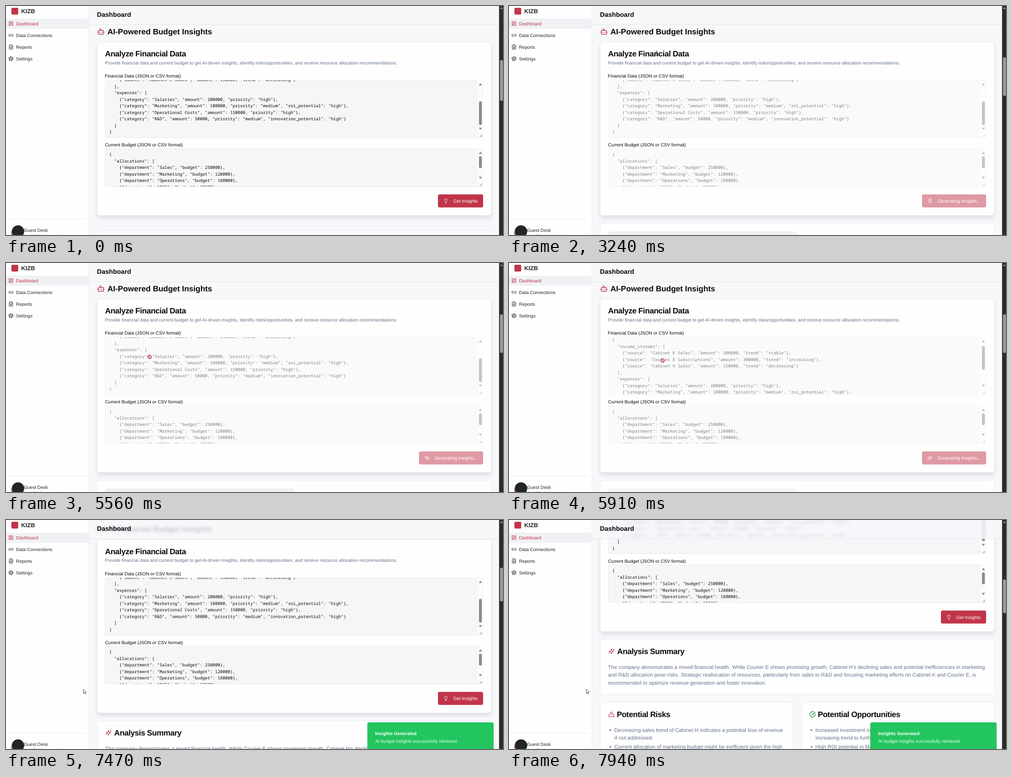
Write an HTML page that moves like this. It is 1100x509 px and loops after 8000 ms.

```html
<!DOCTYPE html>
<html lang="en">
<head>
<meta charset="utf-8">
<title>Budget dashboard</title>
<style>
html, body { margin: 0; width: 100%; height: 100%; overflow: hidden; background: #f7f8fa; }
svg, header { position: absolute; left: 0; top: 0; }
svg { width: 1100px; height: 509px; overflow: hidden; }
header {
  left: 184px; width: 907px; height: 41px;
  background: rgba(247, 248, 250, .8); border-bottom: 1px solid #e3e6eb;
  backdrop-filter: blur(3px);
}
text { font: 10.15px "Liberation Sans", Arial, sans-serif; fill: #09090b; white-space: pre; text-rendering: geometricPrecision; }
.h1 { font-size: 17.4px; font-weight: 700; }
.h2 { font-size: 17.4px; font-weight: 700; letter-spacing: -.435px; }
.bar { font-size: 14.5px; font-weight: 700; }
.logo { font-size: 13.05px; font-weight: 700; fill: #27272a; }
.strong { font-weight: 700; }
.small { font-size: 8.7px; }
.nav text { fill: #27272a; }
.nav .on { fill: #c1354a; }
.muted { fill: #64748b; }
.body text { font-size: 11.6px; fill: #64748b; }
.code text { font: 9.3px "Noto Sans Mono", "Liberation Mono", monospace; fill: #09090b; }
.white text { fill: #fff; }
.icon { fill: none; stroke: currentColor; stroke-width: 2; stroke-linecap: round; stroke-linejoin: round; }
.red { color: #c1354a; }
.green { color: #15803d; }
.dark { color: #27272a; }
.card { fill: #fefefe; stroke: #e4e7ec; stroke-width: .8; }
.raised { filter: drop-shadow(0 6px 5px rgba(15, 23, 42, .11)); }
.field { fill: #f5f6f8; stroke: #e1e4e9; stroke-width: .8; }
.track { fill: #fcfcfc; }
.thumb { fill: #8b8b8b; }
.grip { fill: none; stroke: #444; stroke-width: .9; }
.pointer { fill: #fff; stroke: #222; stroke-width: .8; stroke-linejoin: round; }

.loop, .step { animation: 8s linear infinite; }
.step { animation-timing-function: step-end; }
.idle { animation-name: idle; }
.busy { animation-name: busy; }
.done { animation-name: done; }
.ready { animation-name: ready; }
.fields { animation-name: fields; }
.page { animation-name: page; }
.lines { animation-name: lines; }
.slider { animation-name: slider; }
.outer { fill: #9e9e9e; animation-name: outer; }
.toast { animation-name: toast; }
.mouse { animation-name: mouse; }
.arrow { animation-name: arrow; }
.hand { animation-name: hand; }
.beam { animation-name: beam; }
.block { animation-name: block; }
.spin { animation: spin 1s -.63s linear infinite; }
.pulse { fill: #eff1f4; animation: pulse 2s -.59s cubic-bezier(.4, 0, .6, 1) infinite; }

@keyframes spin { to { transform: rotate(360deg); } }
@keyframes pulse { 50% { opacity: .5; } }
@keyframes idle { 0% { opacity: 1; } 17.625%, 100% { opacity: 0; } }
@keyframes busy { 0% { opacity: 0; } 17.625% { opacity: 1; } 76.375%, 100% { opacity: 0; } }
@keyframes done { 0% { opacity: 0; } 76.375%, 100% { opacity: 1; } }
@keyframes ready { 0% { opacity: 1; } 17.625% { opacity: 0; } 76.375%, 100% { opacity: 1; } }
@keyframes fields { 0% { opacity: 1; } 17.625% { opacity: .5; } 76.375%, 100% { opacity: 1; } }
@keyframes page {
  0%, 93.3% { transform: translateY(0); }
  93.375% { transform: translateY(-36.3px); }
  99.25%, 100% { transform: translateY(-217.5px); }
}
@keyframes lines {
  0%, 72% { transform: translateY(-72.5px); }
  73.875% { transform: translateY(-7.2px); }
  74.6%, 78.7% { transform: translateY(0); }
  81.5%, 86.45% { transform: translateY(-70.5px); }
  86.5%, 100% { transform: translateY(-72.5px); }
}
@keyframes slider {
  0%, 72% { transform: translateY(30.4px); }
  73.875% { transform: translateY(3px); }
  74.6%, 78.7% { transform: translateY(0); }
  81.5%, 86.45% { transform: translateY(29.6px); }
  86.5%, 100% { transform: translateY(30.4px); }
}
@keyframes outer {
  0%, 17.62% { y: 120px; height: 91px; }
  17.625%, 76.37% { y: 114px; height: 86px; }
  76.375%, 93.3% { y: 101px; height: 75px; }
  93.375% { y: 106px; height: 75px; }
  99.25%, 100% { y: 132px; height: 75px; }
}
@keyframes toast {
  0%, 76.375% { transform: translateY(64px); }
  78%, 100% { transform: translateY(0); }
}
@keyframes mouse {
  0%, 3.25% { transform: translate(1046px, 488px); }
  7% { transform: translate(1010px, 455px); }
  11.75%, 14.2% { transform: translate(988px, 431px); }
  15.9%, 22% { transform: translate(992.5px, 435.5px); }
  28% { transform: translate(640px, 235px); }
  34% { transform: translate(390px, 104px); }
  40.5% { transform: translate(326.5px, 105px); }
  47% { transform: translate(300px, 106px); }
  51% { transform: translate(262px, 118px); }
  57.375%, 60% { transform: translate(222.5px, 144px); }
  68% { transform: translate(310px, 206px); }
  73.875%, 89% { transform: translate(340px, 217px); }
  90.75%, 100% { transform: translate(171px, 376px); }
}
@keyframes arrow {
  0% { opacity: 0; } 3.25% { opacity: 1; } 8.2% { opacity: 0; } 17.625% { opacity: 1; }
  24.5% { opacity: 0; } 49% { opacity: 1; } 62.5% { opacity: 0; } 89.4%, 100% { opacity: 1; }
}
@keyframes hand { 0% { opacity: 0; } 8.2% { opacity: 1; } 17.625%, 100% { opacity: 0; } }
@keyframes beam {
  0% { opacity: 0; } 31.5% { opacity: 1; } 49% { opacity: 0; } 76.375% { opacity: 1; } 89.4%, 100% { opacity: 0; }
}
@keyframes block {
  0% { opacity: 0; } 24.5% { opacity: 1; } 31.5% { opacity: 0; } 62.5% { opacity: 1; } 76.375%, 100% { opacity: 0; }
}
</style>
</head>
<body>
<svg viewBox="0 0 1100 509">
  <defs>
    <clipPath id="clip1"><rect x="220" y="165.5" width="824" height="126.5"/></clipPath>
    <clipPath id="clip2"><rect x="220" y="318" width="824" height="83"/></clipPath>
    <g id="spark" class="icon">
      <path d="m12 3-1.9 5.8a2 2 0 0 1-1.3 1.3L3 12l5.8 1.9a2 2 0 0 1 1.3 1.3L12 21l1.9-5.8a2 2 0 0 1 1.3-1.3L21 12l-5.8-1.9a2 2 0 0 1-1.3-1.3ZM20 3v4M22 5h-4M4 17v2M5 18H3"/>
    </g>
    <path id="up" d="M-3.6 2.6h7.2L0-2.6z" fill="#8b8b8b"/>
    <g id="corner"><rect class="track" x="-6" y="-6.5" width="11" height="11"/><path class="grip" d="M-2.5 3l5-5M.5 3l2-2"/></g>
  </defs>

  <g class="loop page">
    <g class="icon red" transform="translate(201.4 48.4) scale(.725)">
      <path d="M12 8V4H8M2 14h2M20 14h2M15 13v2M9 13v2"/><rect x="4" y="8" width="16" height="12" rx="2"/>
    </g>
    <text class="h1" x="224.4" y="63">AI-Powered Budget Insights</text>

    <rect class="card raised" x="202" y="80.7" width="872" height="384.8" rx="5.8"/>
    <text class="h2" x="219.3" y="112.2">Analyze Financial Data</text>
    <text class="muted" x="219" y="129.9">Provide financial data and current budget to get AI-driven insights, identify risks/opportunities, and receive resource allocation recommendations.</text>
    <text x="218.8" y="159.3">Financial Data (JSON or CSV format)</text>
    <text x="219.2" y="312.2">Current Budget (JSON or CSV format)</text>

    <g class="step fields">
      <rect class="field" x="219.6" y="165" width="836" height="127.5" rx="4"/>
      <rect class="track" x="1044" y="165.6" width="11.3" height="126.4" rx="3"/>
      <g clip-path="url(#clip1)"><g class="loop lines code">
        <text x="228.4" y="181.5">{</text>
        <text x="239.6" y="196">"income_streams": [</text>
        <text x="250.7" y="210.5">{"source": "Cabinet K Sales", "amount": 500000, "trend": "stable"},</text>
        <text x="250.7" y="225">{"source": "Courier E Subscriptions", "amount": 300000, "trend": "increasing"},</text>
        <text x="250.7" y="239.5">{"source": "Cabinet H Sales", "amount": 150000, "trend": "decreasing"}</text>
        <text x="239.6" y="254">],</text>
        <text x="239.6" y="268.5">"expenses": [</text>
        <text x="250.7" y="283">{"category": "Salaries", "amount": 200000, "priority": "high"},</text>
        <text x="250.7" y="297.5">{"category": "Marketing", "amount": 100000, "priority": "medium", "roi_potential": "high"},</text>
        <text x="250.7" y="312">{"category": "Operational Costs", "amount": 150000, "priority": "high"},</text>
        <text x="250.7" y="326.5">{"category": "R&amp;D", "amount": 50000, "priority": "medium", "innovation_potential": "high"}</text>
        <text x="239.6" y="341">]</text>
        <text x="228.4" y="355.5">}</text>
      </g></g>
      <use href="#up" x="1050" y="173.8"/>
      <use href="#up" transform="translate(1050 273) scale(1 -1)"/>
      <rect class="thumb loop slider" x="1046.8" y="181.6" width="6.4" height="52.5" rx="3.2"/>
      <use href="#corner" x="1051" y="288"/>

      <rect class="field" x="219.6" y="317.5" width="836" height="84" rx="4"/>
      <rect class="track" x="1044" y="318" width="11.3" height="83" rx="3"/>
      <g class="code" clip-path="url(#clip2)">
        <text x="228.4" y="333.4">{</text>
        <text x="239.6" y="347.9">"allocations": [</text>
        <text x="250.7" y="362.4">{"department": "Sales", "budget": 250000},</text>
        <text x="250.7" y="376.9">{"department": "Marketing", "budget": 120000},</text>
        <text x="250.7" y="391.4">{"department": "Operations", "budget": 180000},</text>
        <text x="250.7" y="405.9">{"department": "R&amp;D", "budget": 60000}</text>
      </g>
      <use href="#up" x="1050" y="326.3"/>
      <use href="#up" transform="translate(1050 382) scale(1 -1)"/>
      <rect class="thumb" x="1046.8" y="334" width="6.4" height="26.3" rx="3.2"/>
      <use href="#corner" x="1051" y="397"/>
    </g>

    <g class="step ready white">
      <rect x="956" y="418.8" width="100" height="29" rx="4" fill="#c1354a"/>
      <path class="icon" color="#fff" transform="translate(967.7 427.6) scale(.483)" d="M15 14c.2-1 .7-1.7 1.5-2.5 1-.9 1.5-2.2 1.5-3.5A6 6 0 0 0 6 8c0 1 .2 2.2 1.5 3.5.7.7 1.3 1.5 1.5 2.5M9 18h6M10 22h4"/>
      <text x="989.9" y="437">Get Insights</text>
    </g>

    <rect class="step idle" x="202" y="488.6" width="872" height=".8" fill="#e2e5ea"/>

    <g class="step busy">
      <g class="white" opacity=".5">
        <rect x="914" y="418.8" width="142" height="29" rx="4" fill="#c1354a"/>
        <g transform="translate(931.7 433.4)"><g class="spin">
          <use href="#spark" color="#fff" transform="scale(.483) translate(-12 -12)"/>
        </g></g>
        <text x="948.2" y="437">Generating Insights...</text>
      </g>
      <rect class="card" x="202" y="483.7" width="872" height="120" rx="5.8"/>
      <rect class="pulse" x="219.5" y="501" width="418" height="23" rx="4"/>
    </g>

    <g class="step done">
      <rect class="card" x="202" y="483.3" width="872" height="121.8" rx="5.8"/>
      <use href="#spark" class="red" transform="translate(219.4 502.4) scale(.604)"/>
      <text class="h2" x="239.6" y="515.5">Analysis Summary</text>
      <g class="body">
        <text x="219.2" y="548.2">The company demonstrates a mixed financial health. While Courier E shows promising growth, Cabinet H's declining sales and potential inefficiencies in marketing</text>
        <text x="219.2" y="565.6">and R&amp;D allocation pose risks. Strategic reallocation of resources, particularly from sales to R&amp;D and focusing marketing efforts on Cabinet K and Courier E, is</text>
        <text x="219.2" y="583">recommended to optimize revenue generation and foster innovation.</text>
      </g>

      <rect class="card" x="202" y="623" width="427.3" height="200" rx="5.8"/>
      <path class="icon red" transform="translate(219.4 642.3) scale(.604)" d="m21.7 18-8-14a2 2 0 0 0-3.5 0l-8 14A2 2 0 0 0 4 21h16a2 2 0 0 0 1.7-3M12 9v4M12 17h.01"/>
      <text class="h2" x="238.5" y="655.3">Potential Risks</text>
      <rect class="card" x="646.8" y="623" width="427.2" height="200" rx="5.8"/>
      <path class="icon green" transform="translate(664.4 642.3) scale(.604)" d="M21.8 10A10 10 0 1 1 17 3.3M9 11l3 3L22 4"/>
      <text class="h2" x="683.5" y="655.3">Potential Opportunities</text>
      <g class="body">
        <g fill="#64748b">
          <circle cx="224.3" cy="684.4" r="1.8"/><circle cx="224.3" cy="721.8" r="1.8"/>
          <circle cx="669.3" cy="684.4" r="1.8"/><circle cx="669.3" cy="721.8" r="1.8"/>
        </g>
        <text x="233" y="688">Decreasing sales trend of Cabinet H indicates a potential loss of revenue</text>
        <text x="233.5" y="705.4">if not addressed.</text>
        <text x="233.2" y="725.4">Current allocation of marketing budget might be inefficient given the high</text>
        <text x="678" y="688">Increased investment in Courier E can leverage its</text>
        <text x="678.3" y="705.4">increasing trend to further boost revenue.</text>
        <text x="678" y="725.4">High ROI potential in Marketing and innovation</text>
      </g>
    </g>
  </g>
</svg>

<header></header>

<svg viewBox="0 0 1100 509">
  <text class="bar" x="201.2" y="23.7">Dashboard</text>

  <rect width="183.5" height="509" fill="#fefefe"/>
  <rect x="183.2" width=".8" height="509" fill="#e3e6eb"/>
  <rect x="12" y="4" width="15" height="15" rx="2" fill="#c1354a"/>
  <text class="logo" x="33.8" y="16.2">KIZB</text>
  <rect y="28" width="183.2" height="22.5" fill="#f0f1f4"/>
  <g class="icon red" transform="translate(5.2 33.4) scale(.483)">
    <rect x="3" y="3" width="7" height="9" rx="1"/><rect x="14" y="3" width="7" height="5" rx="1"/>
    <rect x="14" y="12" width="7" height="9" rx="1"/><rect x="3" y="16" width="7" height="5" rx="1"/>
  </g>
  <path class="icon dark" transform="translate(5.2 59.4) scale(.483)" d="M9 17H7A5 5 0 0 1 7 7h2M15 7h2a5 5 0 1 1 0 10h-2M8 12h8"/>
  <path class="icon dark" transform="translate(5.2 85.4) scale(.483)" d="M15 2H6a2 2 0 0 0-2 2v16a2 2 0 0 0 2 2h12a2 2 0 0 0 2-2V7ZM14 2v4a2 2 0 0 0 2 2h4M10 9H8M16 13H8M16 17H8"/>
  <g class="icon dark" transform="translate(5.2 111.4) scale(.483)">
    <circle cx="12" cy="12" r="7.8"/><circle cx="12" cy="12" r="3"/>
    <circle cx="12" cy="12" r="9.6" stroke-width="2.6" stroke-linecap="butt" pathLength="12" stroke-dasharray="1 1"/>
  </g>
  <g class="nav">
    <text class="on" x="22.2" y="42.7">Dashboard</text>
    <text x="22.2" y="68.7">Data Connections</text>
    <text x="22.2" y="94.7">Reports</text>
    <text x="22.2" y="120.7">Settings</text>
    <text x="39.8" y="501.5">Guest Desk</text>
  </g>
  <text class="muted small" x="40" y="513.6">desk@kizb.example</text>
  <rect x="5.8" y="473" width="171.5" height=".8" fill="#e3e6eb"/>
  <circle cx="22.5" cy="506" r="11.6" fill="#c98f7a"/>
  <circle cx="26.6" cy="501.3" r="13.7" fill="#242424"/>

  <rect x="1091.3" width="8.7" height="509" fill="#2b2b2b"/>
  <path d="M1093.6 6.8h5.6l-2.8-4.2z" fill="#a3a3a3"/>
  <rect class="loop outer" x="1093.4" y="120" width="6.4" height="91" rx="3"/>

  <g class="step done"><g class="loop toast white">
    <rect x="799.7" y="449.7" width="279.6" height="62" rx="4" fill="#22c55e"/>
    <text class="strong" x="817" y="478">Insights Generated</text>
    <text x="817.3" y="495" opacity=".92">AI budget insights successfully retrieved.</text>
  </g></g>

  <g class="loop mouse">
    <path class="step arrow pointer" d="M0 0v9.4l2.2-2 1.5 3.3 1.5-.7-1.5-3.2h3z"/>
    <path class="step hand pointer" d="M-1 1a1 1 0 0 1 2 0v4l5 1.2q1.2.4 1 1.8l-.8 5.5H.5l-4-5q.5-1.4 2.500 0z"/>
    <path class="step beam" d="M-2-5.5q2 0 2 1.200v8.600q0 1.200-2 1.200M2-5.5q-2 0-2 1.200v8.600q0 1.200 2 1.200" fill="none" stroke="#333" stroke-width=".8"/>
    <g class="step block">
      <circle r="4.6" fill="#fff"/>
      <g fill="none" stroke="#b3202c" stroke-width="1.5"><circle r="3.9"/><path d="M-2.7-2.700l5.400 5.400"/></g>
    </g>
  </g>
</svg>
</body>
</html>
```
